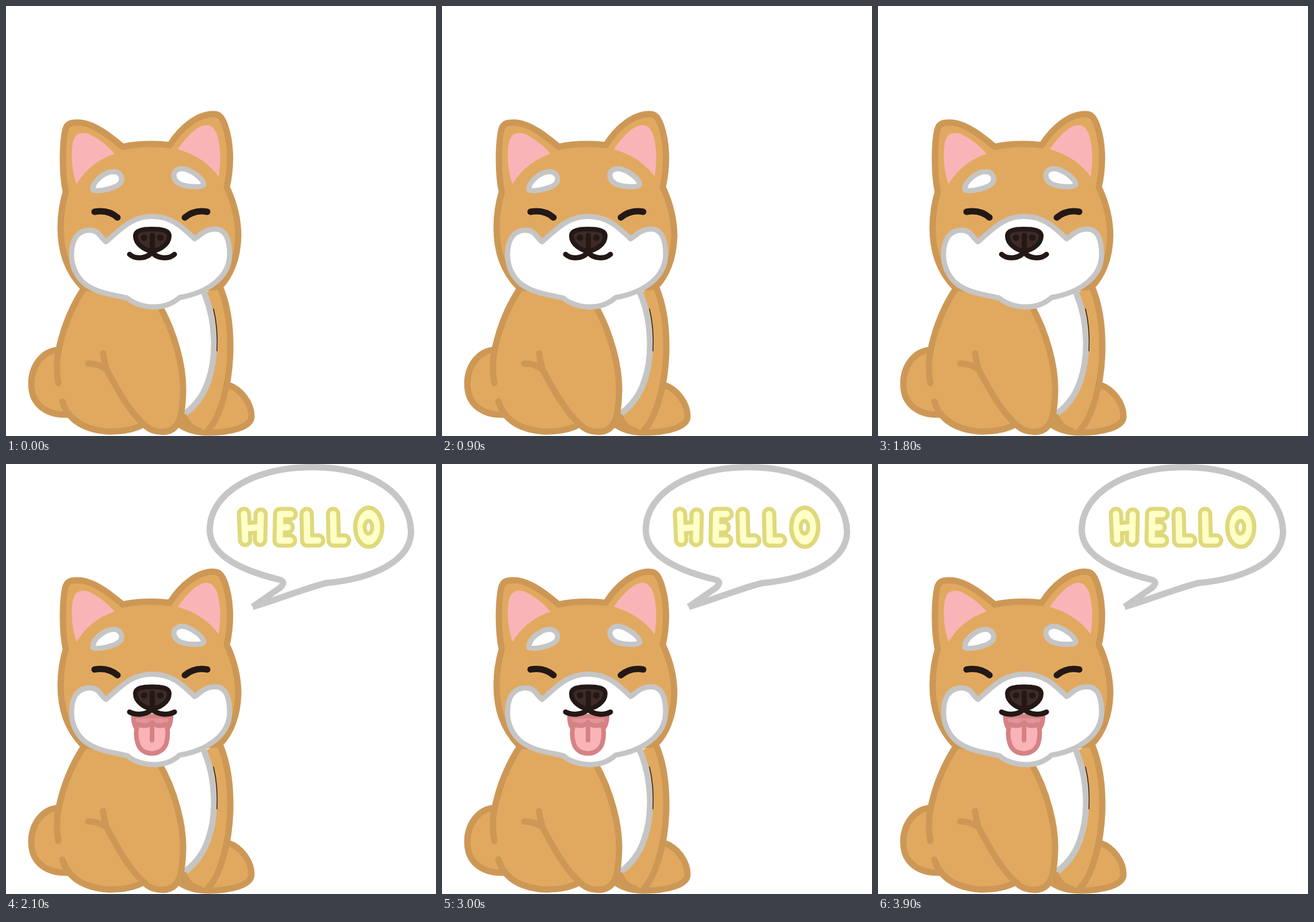
An HTML page that plays this animation: 748 px wide and 748 px high, repeating every 4.5 s.

```html
<!DOCTYPE html>
<html lang="en">
<head>
<meta charset="utf-8">
<title>Puppy says hello</title>
<style>
  html, body { margin: 0; width: 100%; height: 100%; overflow: hidden; background: #fff; }
  svg { display: block; width: 100vw; height: 100vh; }
  path, ellipse { stroke-linejoin: round; stroke-linecap: round; }
  .fur { fill: #e1a95f; stroke: #cd9856; stroke-width: 11; }
  .fill { stroke: none; }
  .line { fill: none; }
  .white { fill: #fff; stroke: #c5c5c5; stroke-width: 9; }
  .pink { fill: #f9b4b7; }
  .ink { fill: none; stroke: #231815; stroke-width: 9; }
  .tongue { fill: #f9b4b7; stroke: #d58285; stroke-width: 8; }
  .letters { fill: none; stroke: #dfd97c; stroke-width: 25; }
  .inner { stroke: #ffffc8; stroke-width: 11; }
</style>
</head>
<body>
<svg viewBox="0 0 748 748">
  <defs>
    <path id="word" d="M414 87L416 132M443 88L442 132M415 112L442 110
      M495 87L477 87L476 133L494 133M477 110H490
      M523 87L524 133L543 133M569 87L570 133L588 133"/>
  </defs>

  <g id="body">
    <path class="fur" d="M92 598C62 600 44 628 44 657C44 695 72 712 108 711L150 660Z"/>
    <path class="fur" d="M386 659C410 667 427 692 427 714C427 733 390 742 352 742C330 742 315 737 303 729L340 670Z"/>
    <path class="fur fill" d="M342 500L372 488C388 525 391 570 390 605C388 665 370 715 352 737C330 740 313 730 306 710Z"/>
    <path d="M262 510L345 500C366 550 368 610 354 650C345 680 325 702 306 712L290 620Z" fill="#fff"/>
    <path class="white line" style="stroke-width:10.5" d="M344 498C365 545 367 610 352 652C343 680 325 701 306 712"/>
    <path class="ink" style="stroke-width:1.4" d="M361 527Q369 560 367 600"/>
    <path class="fur line" d="M372 488C388 525 391 570 390 605C388 665 370 720 351 738M310 715C314 727 322 735 337 739"/>
    <path class="fur fill" d="M138 488C115 520 100 560 93 592C87 615 88 640 91 656L98 688C105 710 122 735 175 740C200 741 222 737 239 728C250 738 262 743 280 740C303 735 307 710 308 670C309 630 295 570 266 520L255 490Z"/>
    <path class="fur line" d="M138 488C115 520 100 560 93 592C87 615 88 640 91 656M98 688C105 710 122 735 175 740C200 741 222 737 239 728"/>
    <path class="fur line" d="M266 520C295 570 309 630 308 670C307 710 303 735 280 740C262 743 250 738 239 727C215 705 195 670 175 632C172 620 170 615 169 604M143 622Q163 622 176 633"/>
  </g>

  <g id="head">
    <path class="fur" d="M134 490C105 460 95 425 95 385C95 360 99 340 104 323C97 290 98 240 103 216C106 203 115 202 130 203C155 206 180 226 203 245C230 239 258 239 285 242C305 210 335 187 362 188C372 188 376 195 381 208C392 240 392 280 384 315C398 345 404 375 404 400C403 440 390 470 372 488L250 500Z"/>
    <path class="pink" d="M123 310C113 285 113 250 117 235C121 220 135 218 147 224C165 233 178 245 189 257C158 268 137 286 123 310Z"/>
    <path class="pink" d="M299 249C312 230 330 209 348 207C360 207 367 218 370 235C374 255 373 275 370 297C352 272 328 258 299 249Z"/>
    <path class="white" d="M151 320C150 305 172 288 188 288C200 289 204 300 199 308C192 317 160 324 151 320Z"/>
    <path class="white" d="M292 296C291 285 302 281 313 284C328 289 344 302 344 311C340 316 318 315 306 311C297 308 293 303 292 296Z"/>
    <path class="ink" style="stroke-width:11" d="M154 358Q178 354 194 368M311 368Q328 354 350 358"/>
    <path class="white" d="M174 410C200 388 218 366 254 366C290 366 308 386 328 405C337 400 345 388 364 388C384 388 389 410 389 432C389 475 345 500 302 507C290 518 275 523.5 258 523.5C240 523.5 222 518 211 508C185 502 160 500 138 484C122 471 114 452 114 433C114 410 122 390 146 390C162 390 164 403 174 410Z"/>
    <g class="open">
      <path class="tongue" style="fill:#e29496" d="M222 439C220 460 236 475 254 475C272 475 288 460 287 439Z"/>
      <path class="tongue" d="M230 453C240 458 248 456 254 450C260 456 269 458 278 453C283 464 281 478 279 486C275 498 265 504 254 504C242 504 232 498 229 486C226 476 225 464 230 453Z"/>
      <path class="tongue line" d="M254 454V481"/>
    </g>
    <path class="ink" d="M225 400C225 390 238 388 254 388C271 388 284 390 284 400C284 415 266 426 254 426C243 426 225 415 225 400Z" style="fill:#3d2b28;stroke-width:8"/>
    <path class="ink" style="stroke-width:11.5" d="M240 403h.1M268.5 403h.1"/>
    <path class="ink" d="M254.5 399V425"/>
    <path class="ink closed" d="M215 432C225 441 245 440 254 428C263 440 283 441 293 432"/>
    <path class="ink open" d="M215 432C225 438 245 437 254 427C263 437 283 438 293 432"/>
  </g>

  <g class="open" role="img" aria-label="HELLO">
    <path d="M429 248.500L477 215C484 208 484 203 475 201C405 184 354 157 354.500 114C355 50 432 5.500 533 5.500C640 5.500 703 55 704.500 117C705 166 643 199 558 207C530 213 480 233 429 248.500" style="fill:#fff;stroke:#c6c6c6;stroke-width:11;stroke-linecap:butt"/>
    <use href="#word" class="letters"/>
    <use href="#word" class="letters inner"/>
    <ellipse cx="631" cy="110" rx="23.500" ry="34" fill="#ffffc8" stroke="#dfd97c" stroke-width="7.500"/>
    <ellipse cx="630.500" cy="110" rx="6.500" ry="11" fill="#fff" stroke="#dfd97c" stroke-width="7"/>
  </g>
</svg>
<script>
  const PERIOD = 900, CLOSED = 300;
  const head = document.getElementById('head');
  const show = (name, on) => document.querySelectorAll(name).forEach(el => {
    el.style.display = on ? '' : 'none';
  });

  function draw() {
    const open = performance.now() % PERIOD >= CLOSED;
    show('.open', open);
    show('.closed', !open);
    head.setAttribute('transform', `translate(0 ${open ? -0.6 : 0})`);
    requestAnimationFrame(draw);
  }
  draw();
</script>
</body>
</html>
```
